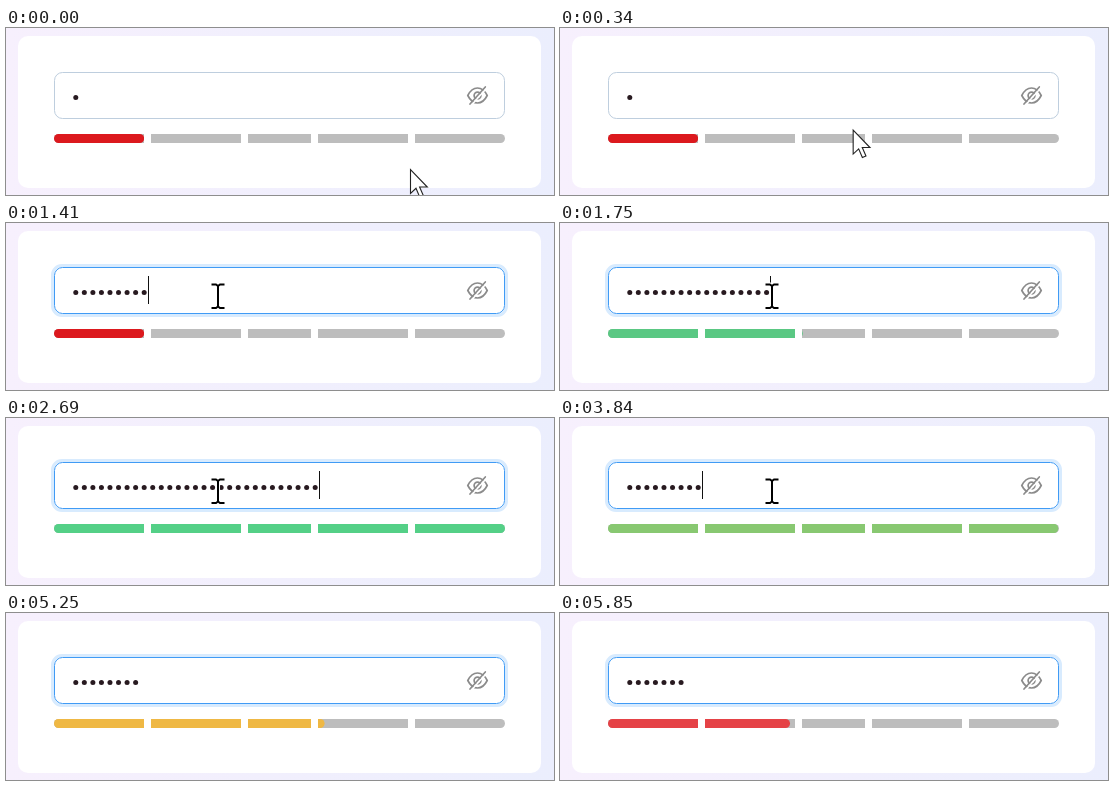
Recreate the animation shown at these times as an HTML page. Size 548 by 167 pixels, loop 5.91 s.

```html
<!DOCTYPE html>
<html lang="en">
<head>
<meta charset="utf-8">
<title>Password strength</title>
<style>
html, body { margin: 0; width: 100%; height: 100%; overflow: hidden; background: #f3f1fd; }
svg { display: block; width: 548px; height: 167px; }
</style>
</head>
<body>
<svg viewBox="0 0 548 167" xmlns="http://www.w3.org/2000/svg">
  <defs>
    <linearGradient id="bg">
      <stop offset="0" stop-color="#f7f0fd"/>
      <stop offset=".5" stop-color="#f1effd"/>
      <stop offset="1" stop-color="#ebeefd"/>
    </linearGradient>
    <clipPath id="segments"></clipPath>
  </defs>
  <rect width="548" height="167" fill="url(#bg)"/>
  <rect x="12" y="8" width="523" height="152" rx="10" fill="#fff"/>

  <rect id="glow" x="46.5" y="42.5" width="454" height="50" rx="9.5" fill="none" stroke="#d8ebfe" stroke-width="3"/>
  <rect id="box" x="48.5" y="44.5" width="450" height="46" rx="8" fill="#fff"/>
  <g id="dots" fill="#281a20"></g>
  <rect id="caret" y="53" width="1" height="28" fill="#111"/>

  <g fill="none" stroke="#8b8b8b" stroke-width="1.7" stroke-linecap="round">
    <path d="M461.8 67.5Q465.5 60 471.5 60T481.2 67.5Q477.500 75 471.500 75T461.800 67.500Z"/>
    <circle cx="471.500" cy="67.500" r="3.400"/>
    <path d="M465.300 77.200L480.500 60.300" stroke="#fff"/>
    <path d="M464 76L479.300 59"/>
  </g>

  <g clip-path="url(#segments)">
    <rect x="48" y="106" width="451" height="9" rx="4.500" fill="#bdbdbd"/>
    <rect id="fill" x="48" y="106" height="9" rx="4.500"/>
  </g>

  <path id="arrow" d="M.5 .5V24.500L6 19.300L9.700 28L13.300 26.500L9.600 18H17.300Z" fill="#fff" stroke="#222" stroke-width="1.100"/>
  <g id="beam" fill="none">
    <path d="M-6.500-11.500H-2L0-10L2-11.500H6.500M0-10V10.500M-6.500 12H-2L0 10.500L2 12H6.500" stroke="#fff" stroke-width="4"/>
    <path d="M-6.500-11.500H-2L0-10L2-11.500H6.500M0-10V10.500M-6.500 12H-2L0 10.500L2 12H6.500" stroke="#000" stroke-width="2"/>
  </g>
</svg>
<script>
const LOOP = 5910, START = 65.5, PITCH = 8.55, MAX = 30;
const NS = 'http://www.w3.org/2000/svg';
const $ = id => document.getElementById(id);

function add(parent, tag, attrs) {
  const el = document.createElementNS(NS, tag);
  for (const key in attrs) el.setAttribute(key, attrs[key]);
  return parent.appendChild(el);
}
function show(el, on) { el.setAttribute('visibility', on ? 'visible' : 'hidden'); }

for (const [x, width] of [[48, 90], [145, 90], [242, 63], [312, 90], [409, 90]]) {
  add($('segments'), 'rect', { x, y: 106, width, height: 9 });
}
const dots = Array.from({ length: MAX }, (_, i) =>
  add($('dots'), 'circle', { cx: START + PITCH * (i + 0.5), cy: 69.5, r: 2.5 }));

const progress = (t, from, length) => Math.min(1, Math.max(0, (t - from) / length));
const mix = (a, b, p) => a + (b - a) * p;
const inOut = p => p < 0.5 ? 4 * p ** 3 : 1 - 4 * (1 - p) ** 3;
const soft = p => p * p * (3 - 2 * p);
const out = p => 1 - (1 - p) ** 2;
const blend = (a, b, p) => a.map((v, i) => mix(v, b[i], p));
const rgb = c => `rgb(${c.map(Math.round)})`;

const RED = [220, 25, 30], CORAL = [229, 66, 70], AMBER = [239, 184, 68], GREEN = [84, 208, 135];
const IDLE = [190, 206, 222], ACTIVE = [64, 155, 245];

// start, duration, target of each strength change
const widths = [[1505, 590, 451], [3785, 570, 270.6], [5300, 660, 180.4]];
const colors = [[1440, 390, GREEN], [3755, 470, AMBER], [5290, 500, CORAL]];

function typed(t) {
  if (t < 2690) return Math.min(MAX, 1 + Math.floor(progress(t, 1058, 1222) * 29.1));
  if (t < 3220) return 29;
  if (t < 5250) return Math.max(9, 28 - Math.floor((t - 3220) / 32.6));
  return t < 5520 ? 8 : 7;
}

function caretOn(t) {
  return (t >= 670 && t < 940) || (t >= 1058 && t < 2820) ||
    (t >= 3350 && t < 3900) || (t >= 4450 && t < 4990) || (t >= 5520 && t < 5845);
}

function pointer(t) {
  if (t < 4400) {
    const p = soft(progress(t, 20, 580));
    return [mix(404, 212, p), mix(141, 73, p)];
  }
  const p = progress(t, 4400, 320) ** 1.3;
  return [mix(212, 345, p), mix(73, 172, p)];
}

function draw(t) {
  const n = typed(t);
  dots.forEach((dot, i) => show(dot, i < n));
  $('caret').setAttribute('x', Math.floor(START + PITCH * n));
  show($('caret'), caretOn(t));

  let width = 90.2, color = RED;
  for (const [from, length, to] of widths) width = mix(width, to, inOut(progress(t, from, length)));
  for (const [from, length, to] of colors) color = blend(color, to, out(progress(t, from, length)));
  $('fill').setAttribute('width', width);
  $('fill').setAttribute('fill', rgb(color));

  const [x, y] = pointer(t);
  const inside = y < 91;
  const visible = t < 4720;
  $('arrow').setAttribute('transform', `translate(${x} ${y})`);
  $('beam').setAttribute('transform', `translate(${x} ${y})`);
  show($('arrow'), visible && !inside);
  show($('beam'), visible && inside);

  $('box').setAttribute('stroke', rgb(blend(IDLE, ACTIVE, progress(t, 360, 200))));
  show($('glow'), t >= 670);
}

function tick() {
  draw(performance.now() % LOOP);
  requestAnimationFrame(tick);
}
tick();
</script>
</body>
</html>
```
